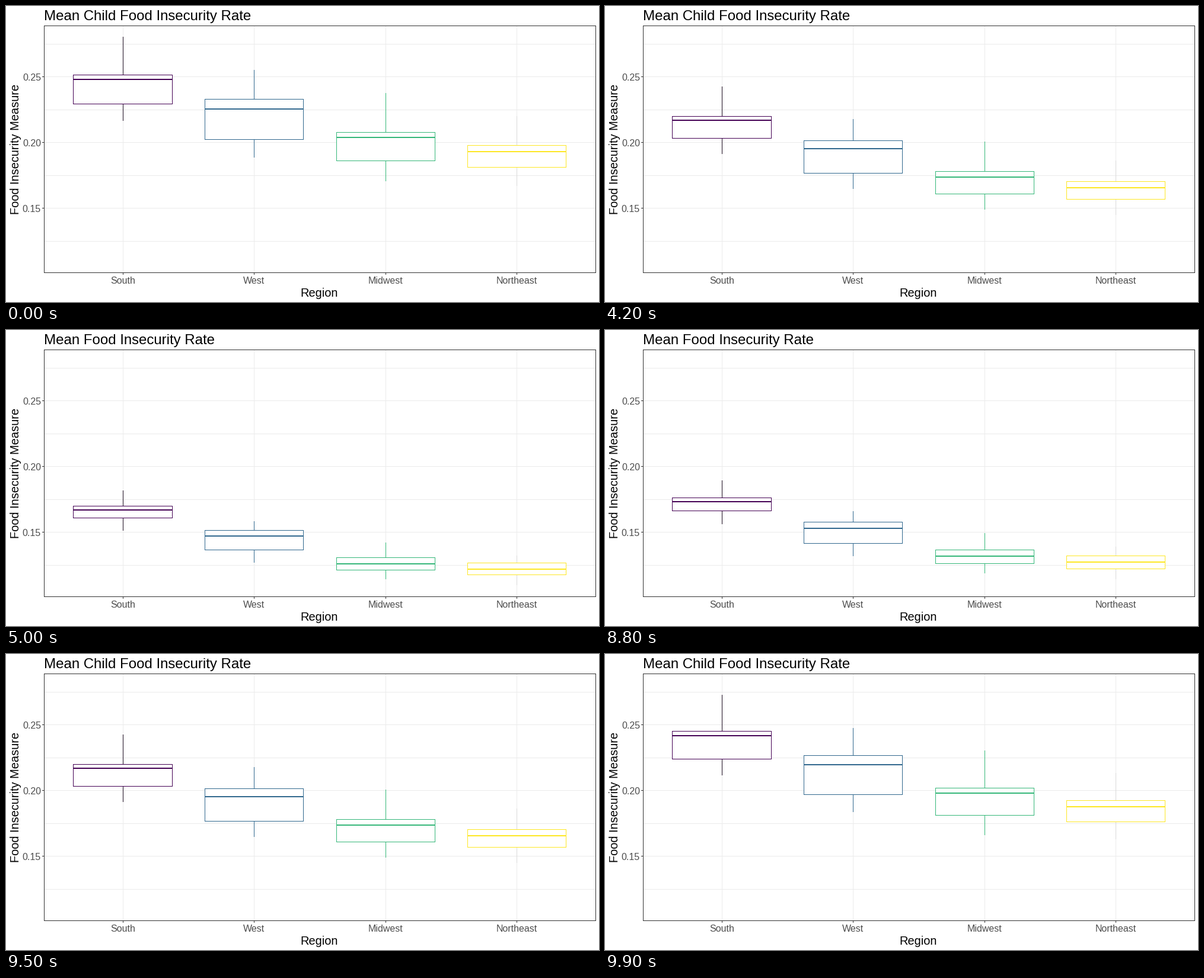
These frames come from a looping animation (1000x500 px, 10000 ms). A matplotlib script:

```python
import math

import matplotlib.pyplot as plt
from matplotlib.animation import FuncAnimation
from matplotlib.patches import Rectangle

plt.rcParams["font.family"] = "Liberation Sans"

WIDTH, HEIGHT, DPI = 1000, 500, 100
FRAMES, INTERVAL = 100, 100
STEPS = 13                    # length of one transition, in frames
DOWN_START, UP_START = 37, 87  # last still frame before each transition

GRID, DARK, LABEL = "#ebebeb", "#333333", "#4d4d4d"
LEFT, TOP, RIGHT, BOTTOM = 64, 33, 994, 450

# Pixel rows: upper whisker, upper hinge, median, lower hinge, lower whisker
REGIONS = [
    # name, centre, left, right, colour, whisker colour, child rate, overall rate
    ("South", 197, 113, 281, "#440154", "#1a0a1e",
     (52, 116, 124, 165, 194), (271, 297, 304, 316.5, 339)),
    ("West", 418, 335, 502, "#31688e", "#31688e",
     (108, 157, 174, 225.4, 256), (323, 338, 348, 371.4, 393)),
    ("Midwest", 640, 557, 724, "#35b779", "#35b779",
     (147, 213, 222, 261.4, 296), (359, 384, 395, 405, 421)),
    ("Northeast", 861, 778, 945, "#fde725", "#d9d9d9",
     (186, 235, 246, 272, 303.5), (381, 393, 404, 413.4, 431)),
]

fig = plt.figure(figsize=(WIDTH / DPI, HEIGHT / DPI), dpi=DPI, facecolor="white")
ax = fig.add_axes([0, 0, 1, 1])
ax.set_xlim(0, WIDTH)
ax.set_ylim(HEIGHT, 0)
ax.axis("off")


def block(x0, y0, x1, y1, color, z=1):
    """Fill the pixels from (x0, y0) up to, not including, (x1, y1)."""
    return ax.add_patch(Rectangle((x0, y0), x1 - x0, y1 - y0, facecolor=color,
                                  linewidth=0, snap=True, zorder=z))


def span(rect, y0, y1):
    rect.set_y(y0)
    rect.set_height(max(y1 - y0, 0))


def label(x, y, text, px, color="black", ha="center", **kwargs):
    return ax.text(x, y, text, fontsize=px * 72 / DPI, color=color, ha=ha,
                   va="baseline", zorder=6, **kwargs)


class Box:
    def __init__(self, centre, left, right, color, whisker, child, overall):
        self.child, self.overall = child, overall
        self.upper = block(centre, 0, centre + 1, 1, whisker, 3)
        self.lower = block(centre, 0, centre + 1, 1, whisker, 3)
        self.frame = block(left, 0, right, 1, color, 4)
        self.inside = block(left + 1, 0, right - 1, 1, "white", 5)
        self.median = block(left, 0, right, 1, color, 5.5)

    def place(self, p):
        high, q3, mid, q1, low = (math.floor(a + (b - a) * p + 0.5)
                                  for a, b in zip(self.child, self.overall))
        span(self.upper, high, q3)
        span(self.lower, q1, low)
        span(self.frame, q3, q1 + 1)
        span(self.inside, q3 + 1, q1)
        span(self.median, mid - 1, mid + 1)


# Grid, panel border and axes
for row in range(64, BOTTOM, 111):
    block(LEFT, row, RIGHT, row + 1, GRID)
for i, row in enumerate((119, 230, 341)):
    block(LEFT, row, RIGHT, row + 1, GRID)
    block(LEFT - 3, row, LEFT, row + 1, DARK, 2)
    label(59, row + 7, f"{0.25 - 0.05 * i:.2f}", 16, LABEL, "right")
for name, centre, *_ in REGIONS:
    block(centre, TOP, centre + 1, BOTTOM, GRID)
    block(centre, BOTTOM, centre + 1, BOTTOM + 4, DARK, 2)
    label(centre, 469, name, 16, LABEL)
for edge in ((LEFT, TOP, RIGHT + 1, TOP + 1), (LEFT, BOTTOM, RIGHT + 1, BOTTOM + 1),
             (LEFT, TOP, LEFT + 1, BOTTOM), (RIGHT, TOP, RIGHT + 1, BOTTOM)):
    block(*edge, DARK, 2)

label(528.5, 491, "Region", 20)
label(22, 242, "Food Insecurity Measure", 20, rotation=90, rotation_mode="anchor")
title = label(64, 24, "", 24, ha="left")
boxes = [Box(*region[1:]) for region in REGIONS]


def ramp(frame, start):
    return min(max(frame - start, 0), STEPS) / STEPS


def update(frame):
    p = ramp(frame, DOWN_START) - ramp(frame, UP_START)
    title.set_text("Mean Child Food Insecurity Rate" if p < 0.5
                   else "Mean Food Insecurity Rate")
    for box in boxes:
        box.place(p)
    return []


anim = FuncAnimation(fig, update, frames=FRAMES, interval=INTERVAL,
                     repeat=True, repeat_delay=0, blit=False)
plt.show()
```
